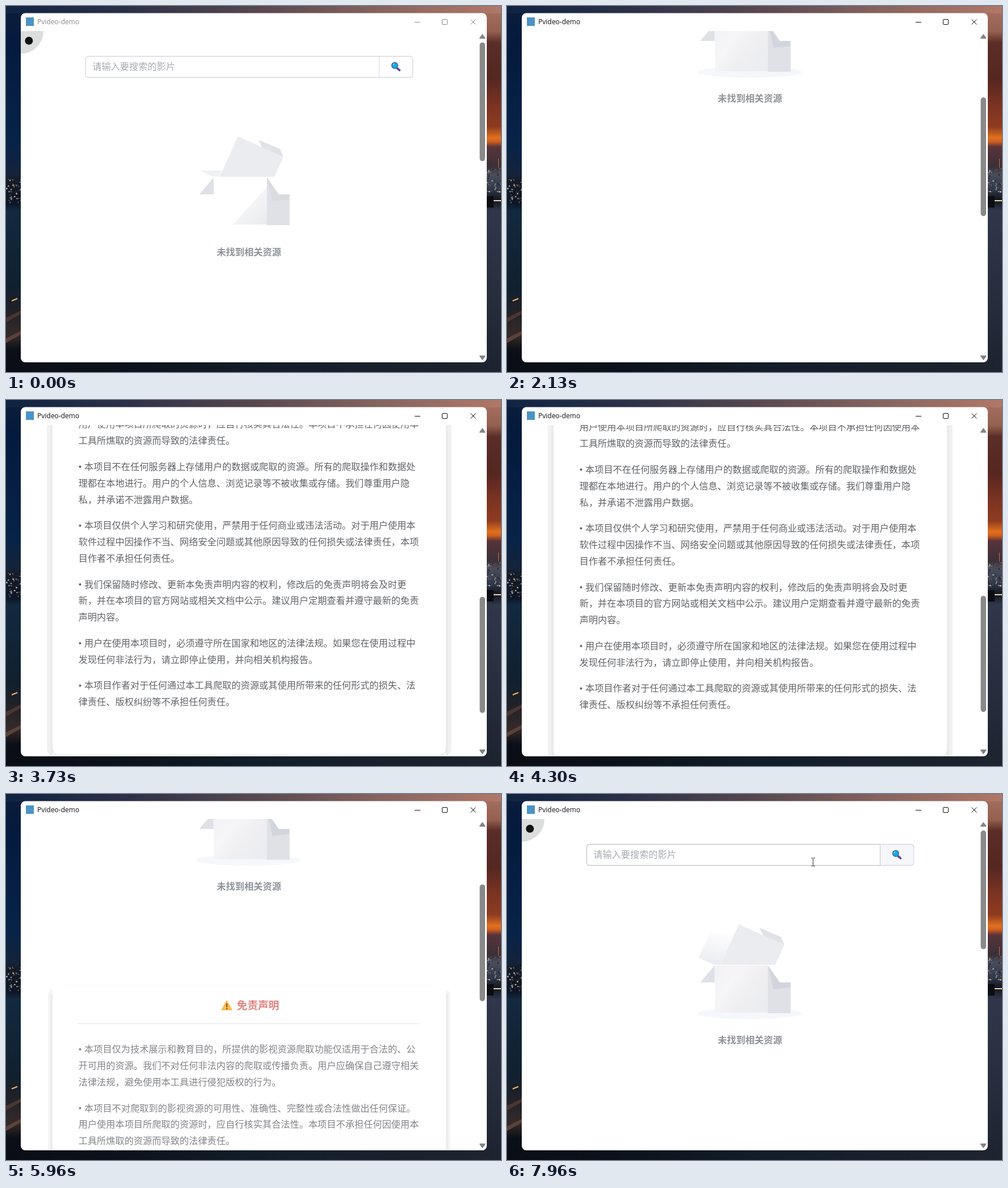
Animation of 871 by 643 pixels, one loop 8000 ms. Source, as an HTML page with a canvas:

```html
<!DOCTYPE html>
<html lang="zh-CN">
<head>
<meta charset="utf-8">
<title>Pvideo-demo</title>
<style>
html, body { margin: 0; width: 100%; height: 100%; overflow: hidden; background: #0d1626; }
canvas { display: block; width: 871px; height: 643px; }
</style>
</head>
<body>
<canvas id="stage" width="871" height="643"></canvas>
<script>
const ctx = document.getElementById('stage').getContext('2d');
const LOOP = 8000;
const CJK = '"Noto Sans CJK SC", "Noto Sans CJK", sans-serif';
const VIEW = { x: 26, y: 44, w: 820, h: 582 };
const TRACK = { top: 64, h: 544 };

// [time, value] pairs, eased between neighbours
const SCROLL = [
  [1430, 0], [1640, 135], [1880, 135], [2130, 269.5], [2380, 269.5],
  [2620, 538], [2750, 560], [3020, 804], [4270, 804], [4300, 799],
  [4540, 538], [4930, 538], [5140, 472], [5240, 472], [5340, 404],
  [5430, 404], [5600, 269.5], [5960, 269.5], [6200, 135], [6780, 135], [6900, 0]
];
const FADE_OUT = [[5500, 1], [5600, 0.8], [5960, 0.78], [6600, 0]];

const PARAGRAPHS = [
  ['本项目仅为技术展示和教育目的,所提供的影视资源爬取功能仅适用于合法的、公',
   '开可用的资源。我们不对任何非法内容的爬取或传播负责。用户应确保自己遵守相关',
   '法律法规,避免使用本工具进行侵犯版权的行为。'],
  ['本项目不对爬取到的影视资源的可用性、准确性、完整性或合法性做出任何保证。',
   '用户使用本项目所爬取的资源时,应自行核实其合法性。本项目不承担任何因使用本',
   '工具所燋取的资源而导致的法律责任。'],
  ['本项目不在任何服务器上存储用户的数据或爬取的资源。所有的爬取操作和数据处',
   '理都在本地进行。用户的个人信息、浏览记录等不被收集或存储。我们尊重用户隐',
   '私,并承诺不泄露用户数据。'],
  ['本项目仅供个人学习和研究使用,严禁用于任何商业或违法活动。对于用户使用本',
   '软件过程中因操作不当、网络安全问题或其他原因导致的任何损失或法律责任,本项',
   '目作者不承担任何责任。'],
  ['我们保留随时修改、更新本免责声明内容的权利,修改后的免责声明将会及时更',
   '新,并在本项目的官方网站或相关文档中公示。建议用户定期查看并遵守最新的免责',
   '声明内容。'],
  ['用户在使用本项目时,必须遵守所在国家和地区的法律法规。如果您在使用过程中',
   '发现任何非法行为,请立即停止使用,并向相关机构报告。'],
  ['本项目作者对于任何通过本工具爬取的资源或其使用所带来的任何形式的损失、法',
   '律责任、版权纠纷等不承担任何责任。']
].map(lines => lines.map(s => s.replace(/,/g, '\uff0c')));

function track(keys, t) {
  if (t <= keys[0][0]) return keys[0][1];
  for (let i = 1; i < keys.length; i++) {
    const [t0, a] = keys[i - 1], [t1, b] = keys[i];
    if (t < t1) {
      const k = (t - t0) / (t1 - t0);
      return a + (b - a) * k * k * (3 - 2 * k);
    }
  }
  return keys[keys.length - 1][1];
}

function reveal(t) {
  if (t < 3200) return 0;
  if (t < 5500) return 1 - Math.pow(1 - Math.min(1, (t - 3200) / 730), 4);
  return track(FADE_OUT, t);
}

function rect(x, y, w, h, fill) {
  ctx.fillStyle = fill;
  ctx.fillRect(x, y, w, h);
}

function round(x, y, w, h, r, fill) {
  ctx.beginPath();
  ctx.roundRect(x, y, w, h, r);
  ctx.fillStyle = fill;
  ctx.fill();
}

function poly(fill, ...pts) {
  ctx.beginPath();
  for (let i = 0; i < pts.length; i += 2) ctx.lineTo(pts[i], pts[i + 1]);
  ctx.closePath();
  ctx.fillStyle = fill;
  ctx.fill();
}

function disc(x, y, rx, ry, fill) {
  ctx.beginPath();
  ctx.ellipse(x, y, rx, ry, 0, 0, Math.PI * 2);
  ctx.fillStyle = fill;
  ctx.fill();
}

function line(color, width, ...pts) {
  ctx.beginPath();
  for (let i = 0; i < pts.length; i += 4) {
    ctx.moveTo(pts[i], pts[i + 1]);
    ctx.lineTo(pts[i + 2], pts[i + 3]);
  }
  ctx.strokeStyle = color;
  ctx.lineWidth = width;
  ctx.stroke();
}

function gradient(x0, y0, x1, y1, stops) {
  const g = ctx.createLinearGradient(x0, y0, x1, y1);
  stops.forEach(([at, color]) => g.addColorStop(at, color));
  return g;
}

// y is the optical middle of the line
function text(s, x, y, size, color, font = CJK, weight = 400, align = 'left') {
  ctx.font = `${weight} ${size}px ${font}`;
  ctx.textAlign = align;
  ctx.fillStyle = color;
  ctx.fillText(s, x, y + size * 0.38);
}

function random(seed) {
  return () => (seed = (seed * 16807) % 2147483647) / 2147483647;
}

function desktop() {
  rect(0, 0, 436, 643, gradient(0, 0, 0, 643, [
    [0, '#0b1d3b'], [0.1, '#041a3e'], [0.38, '#082348'], [0.46, '#14233a'],
    [0.48, '#141a26'], [0.54, '#0c1626'], [0.56, '#12293f'],
    [0.77, '#10202f'], [0.83, '#202128'], [0.9, '#352a29'], [0.94, '#0b0f17'], [1, '#090c13']]));
  rect(436, 0, 435, 643, gradient(0, 0, 0, 643, [
    [0, '#a87264'], [0.07, '#94604f'], [0.1, '#5b2d28'], [0.2, '#552721'], [0.27, '#7b3322'],
    [0.33, '#8e3c20'], [0.36, '#e0701e'], [0.37, '#d2601e'], [0.385, '#58343a'], [0.44, '#3a3038'],
    [0.46, '#4b4c5a'], [0.5, '#30384a'], [0.53, '#14171f'], [0.56, '#30374b'],
    [0.8, '#272d3d'], [1, '#1c222e']]));
  rect(0, 0, 871, 13, gradient(0, 0, 871, 0, [
    [0, '#0f2342'], [0.25, '#2d3147'], [0.5, '#56474f'], [0.75, '#85635f'], [1, '#b07868']]));
  rect(0, 626, 871, 17, gradient(0, 0, 871, 0, [
    [0, '#0a0d14'], [0.25, '#0c131c'], [0.5, '#121d29'], [1, '#1e2430']]));
  const rnd = random(41);
  const lights = ['#8e98a8', '#c4a684', '#485870', '#20242c', '#6c5850'];
  for (let i = 0; i < 90; i++) {
    const x = (i % 2 ? 846 : 0) + rnd() * 25;
    const y = (i % 2 ? 284 : 303) + rnd() * 42;
    rect(x, y, 1 + rnd() * 2, 1 + rnd() * 2, lights[i % 5]);
  }
  poly('#4b3632', 0, 548, 26, 535, 26, 541, 0, 556);
  poly('#5b423a', 0, 584, 26, 571, 26, 577, 0, 592);
  line('#f5b566', 2, 10, 518, 20, 514);
  rect(846, 334, 12, 20, '#0b0d12');
  line('#f0d8a8', 2, 858, 342, 871, 342);
  line('#d9653a', 1, 866.5, 268, 866.5, 284);
}

function titleBar(active) {
  const color = active ? '#111' : '#8b8b8b';
  rect(35, 20, 14, 15, '#4b93c6');
  text('Pvideo-demo', 55, 27.8, 12, color, '"Open Sans", sans-serif');
  line(color, 1, 719, 28.5, 729, 28.5, 817.5, 23.5, 826.5, 32.5, 826.5, 23.5, 817.5, 32.5);
  ctx.beginPath();
  ctx.roundRect(767.5, 23.5, 9, 9, 1.5);
  ctx.stroke();
}

function searchBox(active, hover) {
  if (active) round(657, 88, 59, 38, [0, 5, 5, 0], '#f5f7fa');
  ctx.beginPath();
  ctx.roundRect(140.2, 88.5, 575.5, 37, 5);
  ctx.strokeStyle = '#d5d8e0';
  ctx.lineWidth = 1.3;
  ctx.stroke();
  line('#d5d8e0', 1, 656.5, 89, 656.5, 125);
  if (hover) {
    ctx.beginPath();
    ctx.roundRect(140.5, 88.5, 516, 37, [5, 0, 0, 5]);
    ctx.strokeStyle = '#c0c4cc';
    ctx.stroke();
  }
  text('请输入要搜索的影片', 152, 106, 16.2, '#a8abb2');
  ctx.lineCap = 'round';
  line('#5b4a8c', 3.6, 688.5, 109.5, 692.5, 112.8);
  ctx.lineCap = 'butt';
  disc(684, 104.6, 6, 6, '#574a86');
  disc(684, 104.6, 4.8, 4.8, '#08aeea');
  disc(682, 102.6, 1.3, 1.1, '#8ce0f8');
}

function emptyBox(active) {
  if (active) {
    disc(427, 385.5, 92, 10, '#f5f7fb');
    poly(gradient(365, 243, 355, 300, [[0, '#fdfdfe'], [1, '#e9ebef']]),
      358, 243, 402, 243, 378, 300, 365, 300, 337, 288);
    rect(366, 301, 93, 83, gradient(366, 322, 450, 384, [
      [0, '#f3f3f5'], [0.28, '#f6f6f8'], [0.3, '#f5f5f7'], [0.6, '#efeff2'], [1, '#ebecf0']]));
  } else {
    poly('#f0f1f4', 340, 289, 380, 289, 375, 300, 362, 299);
    poly(gradient(420, 345, 459, 384, [[0, '#f7f7f8'], [1, '#e9eaee']]),
      399, 384, 459, 318, 459, 384);
  }
  poly('#e0e2e8', 444, 235, 482, 251, 488, 265, 451, 249);
  poly('#ebecf0', 408, 229, 488, 265, 472, 300, 376, 300);
  poly('#dfe1e7', 365.5, 301, 365.5, 331, 340, 331);
  poly('#dfe1e7', 459, 301, 480, 331, 499, 331, 499, 385, 459, 385);
  poly(active ? '#d2d5dd' : '#d9dbe0', 459, 301, 480, 331, 499, 331, 499, 340, 469, 343);
  text('未找到相关资源', 427.5, 431.5, 16.2, '#8f9399', CJK, 700, 'center');
}

function disclaimer(p) {
  if (p < 0.01) return;
  const top = 599 + 30 * (1 - p), bottom = 1428, w = 10 * p;
  ctx.save();
  ctx.globalAlpha = p;
  const h = bottom - top - 8;
  round(82 - w, top + 8, w, h, [w, 0, 0, w], '#f1f1f1');
  round(774, top + 8, w, h, [0, w, w, 0], '#f1f1f1');
  rect(78, top + 16, 4, h - 8, '#ebebeb');
  rect(774, top + 16, 4, h - 8, '#ebebeb');
  line('#f3f3f3', 1, 107, top + 0.5, 750, top + 0.5);
  ctx.beginPath();
  ctx.moveTo(82, bottom - 12);
  ctx.arcTo(82, bottom, 94, bottom, 10);
  ctx.arcTo(774, bottom, 774, bottom - 12, 10);
  ctx.lineTo(774, bottom - 12);
  ctx.strokeStyle = '#dadada';
  ctx.stroke();

  ctx.translate(0, 16 * (1 - p));
  ctx.lineJoin = 'round';
  poly('#fbad28', 388.5, 630, 397, 645, 380, 645);
  ctx.strokeStyle = '#fbad28';
  ctx.lineWidth = 2;
  ctx.stroke();
  line('#3a2e22', 2, 388.5, 634, 388.5, 640.5);
  disc(388.5, 643, 1.2, 1.2, '#3a2e22');
  text('免责声明', 406, 637, 18.7, '#d7635e', CJK, 700);
  line('#dcdcdc', 1, 127, 669.5, 728, 669.5);

  let y = 714;
  for (const lines of PARAGRAPHS) {
    disc(130.3, y + 0.5, 2, 2, '#606266');
    lines.forEach((s, i) => {
      text(s, i ? 127.5 : 137.8, y, 16.2, '#606266');
      y += 28.85;
    });
    y += 16.8;
  }
  ctx.restore();
}

function scrollBar(scroll, p) {
  const total = 1518 + 34 * p;
  const k = TRACK.h / total;
  round(833.5, TRACK.top + scroll * k, 9.5, VIEW.h * k, 4.75, '#898989');
  ctx.lineJoin = 'round';
  ctx.strokeStyle = '#858585';
  ctx.lineWidth = 2;
  poly('#858585', 838.3, 50.5, 842.5, 56.5, 834, 56.5);
  ctx.stroke();
  poly('#858585', 834, 615, 842.5, 615, 838.3, 621);
  ctx.stroke();
}

function textCursor() {
  line('#333', 1, 538.5, 113, 538.5, 126,
    535.5, 112.5, 538, 112.5, 539, 112.5, 542, 112.5,
    535.5, 126.5, 538, 126.5, 539, 126.5, 542, 126.5);
}

function draw(t) {
  const active = t >= 1090;
  const scroll = track(SCROLL, t), p = reveal(t);
  desktop();
  round(26, 12.5, 820, 613.5, 8, '#fff');
  titleBar(active);

  ctx.save();
  ctx.beginPath();
  ctx.roundRect(VIEW.x, VIEW.y, VIEW.w, VIEW.h, [0, 0, 8, 8]);
  ctx.clip();
  ctx.translate(0, -scroll);
  disc(26, 44, 40, 40, '#dcdddd');
  disc(40.3, 61, 7, 7, '#111');
  searchBox(active, t >= 7960);
  emptyBox(active);
  disclaimer(p);
  ctx.restore();

  scrollBar(scroll, p);
  if (t >= 7500) textCursor();
}

const start = performance.now();
function tick() {
  draw((performance.now() - start) % LOOP);
  requestAnimationFrame(tick);
}
tick();
</script>
</body>
</html>
```
